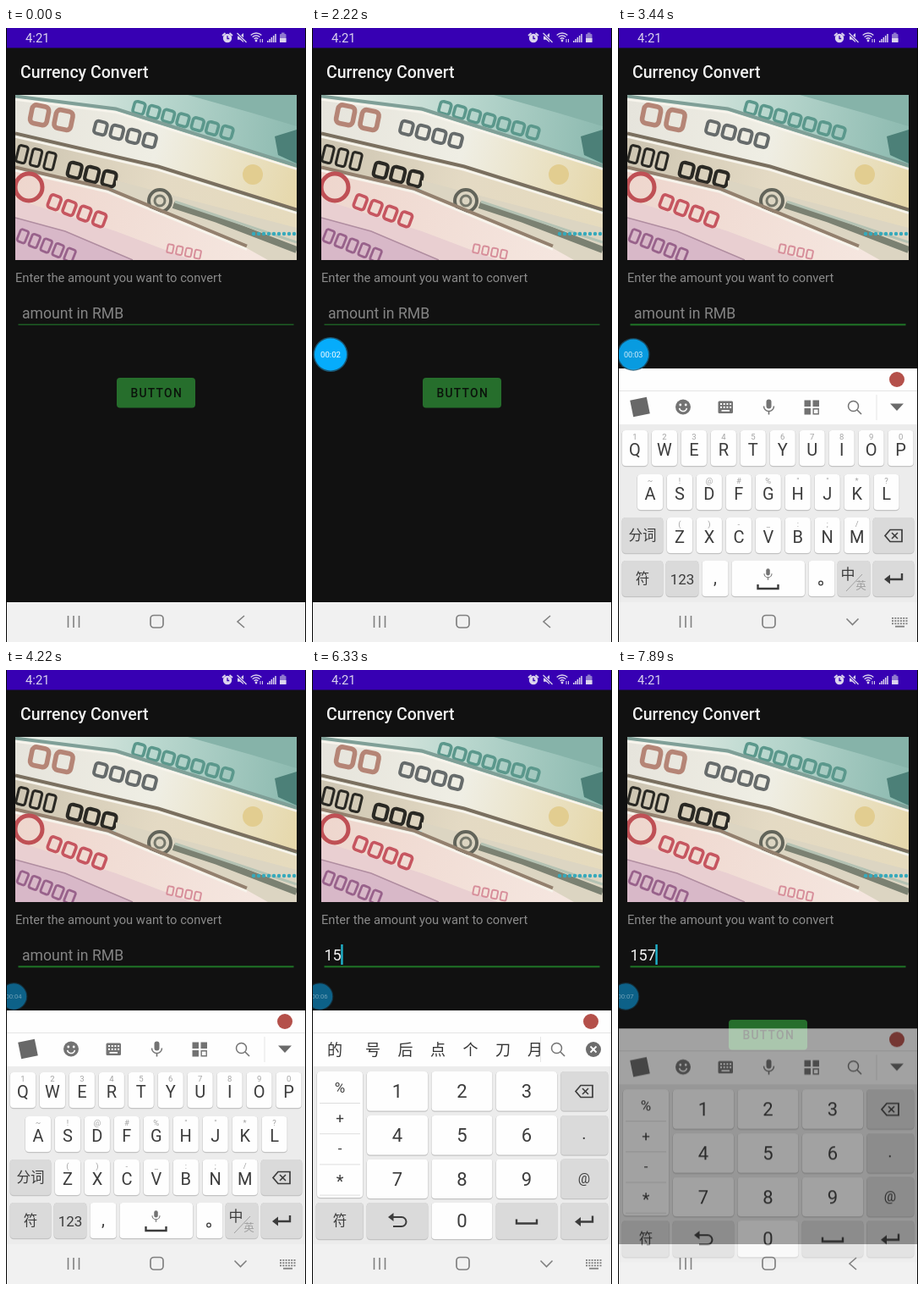
Animation, 355 px wide and 725 px high, one loop 8000 ms. Source, as an HTML page with a canvas:

```html
<!DOCTYPE html>
<html lang="zh-CN">
<head>
<meta charset="utf-8">
<title>Currency Convert</title>
<style>
html, body { margin: 0; width: 100%; height: 100%; overflow: hidden; background: #111; }
canvas { display: block; width: 355px; height: 725px; }
</style>
</head>
<body>
<canvas id="stage"></canvas>
<script>
const W = 355, H = 725, LOOP = 8000;
const FONT = 'Roboto, "Noto Sans CJK SC", "Noto Sans CJK", sans-serif';
const dpr = window.devicePixelRatio || 1;
const TAU = Math.PI * 2;

// Timeline in ms
const BUBBLE_IN = 400, DOCK = 3400, FOCUS = 2700, NUMERIC = 4500, HIDE = 7780;
const TYPED = [[4900, '1'], [5900, '15'], [6800, '157']];

function setup(canvas) {
  canvas.width = W * dpr;
  canvas.height = H * dpr;
  const c = canvas.getContext('2d');
  c.scale(dpr, dpr);
  return c;
}
const screen = setup(document.getElementById('stage'));
const clamp = v => Math.max(0, Math.min(1, v));
const ease = v => 1 - Math.pow(1 - clamp(v), 2);

// All helpers draw into the current context
let g = screen;

function rect(x, y, w, h, color) {
  g.fillStyle = color;
  g.fillRect(x, y, w, h);
}
function round(x, y, w, h, r, color) {
  g.fillStyle = color;
  g.beginPath();
  g.roundRect(x, y, w, h, r);
  g.fill();
}
function roundLine(x, y, w, h, r, color, lw) {
  g.strokeStyle = color;
  g.lineWidth = lw;
  g.beginPath();
  g.roundRect(x, y, w, h, r);
  g.stroke();
}
function disc(x, y, r, color) {
  g.fillStyle = color;
  g.beginPath();
  g.arc(x, y, r, 0, TAU);
  g.fill();
}
function arc(x, y, r, a, b, color, lw) {
  g.strokeStyle = color;
  g.lineWidth = lw;
  g.beginPath();
  g.arc(x, y, r, a, b);
  g.stroke();
}
function trace(pts) {
  g.beginPath();
  for (let i = 0; i < pts.length; i += 2) g.lineTo(pts[i], pts[i + 1]);
}
function line(pts, color, lw) {
  trace(pts);
  g.strokeStyle = color;
  g.lineWidth = lw;
  g.stroke();
}
function poly(pts, color) {
  trace(pts);
  g.fillStyle = color;
  g.fill();
}
function text(s, x, y, size, color, align = 'left', weight = 400) {
  g.font = `${weight} ${size}px ${FONT}`;
  g.textAlign = align;
  g.fillStyle = color;
  g.fillText(s, x, y);
}
function fade(x0, y0, x1, y1, ...colors) {
  const f = g.createLinearGradient(x0, y0, x1, y1);
  colors.forEach((c, i) => f.addColorStop(i / (colors.length - 1), c));
  return f;
}

// Row of slanted blocks suggesting printed lettering
function blocks(x, y, n, w, h, gap, angle, color) {
  g.save();
  g.translate(x, y);
  g.rotate(angle);
  for (let i = 0; i < n; i++) {
    roundLine(i * (w + gap), 0, w, h, w / 4, color, w * 0.28);
  }
  g.restore();
}
// Bright paper edge with a soft shadow above it
function edge(pts, shade) {
  g.save();
  g.translate(0, -2.5);
  line(pts, shade, 4);
  g.translate(0, 4);
  line(pts, '#f7f4ec', 2.5);
  g.restore();
}

function photo() {
  g.save();
  g.beginPath();
  g.rect(11, 79, 333, 195);
  g.clip();
  rect(11, 79, 333, 195, fade(11, 79, 344, 120, '#eef1ea', '#b9d7ce', '#8dbab0'));
  poly([215, 79, 344, 79, 344, 116, 290, 100], '#86b3a9');
  poly([318, 128, 344, 120, 344, 160, 322, 150], '#4c8078');
  blocks(153, 86, 7, 13, 14, 5, 0.27, '#5b988c');
  poly([11, 83, 130, 98, 344, 165, 344, 216, 180, 166, 11, 126],
    fade(11, 100, 344, 190, '#e6e4dc', '#efeee4', '#e6d8ac'));
  edge([11, 83, 130, 98, 344, 165], '#7f9f97');
  blocks(32, 90, 2, 20, 22, 9, 0.2, '#b58576');
  blocks(107, 109, 4, 14, 15, 6, 0.25, '#666b6b');
  disc(292, 173, 12, '#e2cd90');
  poly([11, 127, 180, 166, 344, 217, 344, 240, 160, 196, 11, 166],
    fade(11, 140, 344, 230, '#cdc5b2', '#e4dac4', '#e6dbbd'));
  edge([11, 127, 180, 166, 344, 217], '#7a6f5f');
  blocks(16, 138, 3, 11, 20, 6, 0.24, '#2a2924');
  blocks(76, 158, 3, 15, 17, 6, 0.24, '#2a2924');
  poly([130, 180, 344, 236, 344, 274, 270, 274, 130, 206], '#dcd5c2');
  arc(182, 204, 13, 0, TAU, '#62645a', 4);
  arc(182, 204, 6, 0, TAU, '#75776b', 3);
  line([198, 209, 250, 226, 344, 262], '#7b8172', 8);
  line([200, 205, 344, 253], '#b4c2b3', 3);
  poly([11, 167, 120, 192, 285, 260, 310, 274, 11, 274],
    fade(11, 180, 290, 274, '#eed6cd', '#f5e6df'));
  edge([11, 167, 120, 192, 285, 260], '#93806e');
  poly([11, 202, 130, 240, 220, 274, 11, 274], '#e9cfd1');
  arc(27, 188, 16, 0, TAU, '#bf5055', 5);
  blocks(54, 196, 4, 13, 16, 6, 0.36, '#c65660');
  poly([11, 224, 70, 240, 150, 274, 11, 274], '#d8b8c8');
  line([11, 224, 70, 240, 150, 274], '#b08da0', 1.5);
  blocks(18, 237, 5, 10, 15, 5, 0.38, '#98628b');
  blocks(192, 255, 4, 7, 10, 4, 0.2, '#d78f9b');
  for (let x = 293; x < 342; x += 6) disc(x, 243, 2.2, '#36a9bb');
  g.restore();
}

function statusBar() {
  const ink = '#dcd4ee', bar = '#3700b3';
  rect(0, 0, W, 23.5, bar);
  text('4:21', 23, 17, 14.8, ink);
  // alarm
  disc(262, 12, 5.2, ink);
  line([262, 9.2, 262, 12.5, 264.2, 12.5], bar, 1.3);
  line([256, 9, 259.5, 6], ink, 1.7);
  line([268, 9, 264.5, 6], ink, 1.7);
  // muted speaker
  poly([274, 9.5, 277, 9.5, 281, 6, 281, 17, 277, 13.7, 274, 13.7], ink);
  line([273.5, 6, 284.5, 17], bar, 3);
  line([273.5, 6, 284.5, 17], ink, 1.3);
  // wifi
  for (const r of [3.5, 6.5, 9.5]) arc(296, 15.5, r, -2.3, -0.84, ink, 1.4);
  disc(296, 15, 1.4, ink);
  line([301, 13, 301, 17], ink, 1);
  line([303.5, 13, 303.5, 17], ink, 1);
  // signal
  for (let i = 0; i < 5; i++) rect(309 + i * 2.3, 15 - i * 2, 1.5, 2 + i * 2, ink);
  // battery
  rect(326, 5.5, 3.5, 2, '#8f78cf');
  round(324, 7, 7.5, 10, 1, '#8f78cf');
  rect(324, 12, 7.5, 5, ink);
}

function bubble(t) {
  if (t < BUBBLE_IN) return;
  const p = ease((t - DOCK) / 250);
  const sec = '00:0' + Math.floor(t / 1000);
  g.save();
  g.globalAlpha = 1 - 0.59 * p;
  g.translate(22 - 13 * p, 385.5);
  g.scale(1 - 0.2 * p, 1 - 0.2 * p);
  disc(0, 0, 20.5, '#1a5673');
  disc(0, 0, 19, '#06acfb');
  text(sec, 0, 3.5, 9.6, '#fff', 'center');
  g.restore();
}

function field(t) {
  const focused = t >= FOCUS;
  let value = '', since = FOCUS;
  for (const [at, s] of TYPED) if (t >= at) { value = s; since = at; }
  if (value) text(value, 14.5, 343, 18, '#f2f2f2');
  else text('amount in RMB', 19, 342.5, 17.6, '#858585');
  if (focused) rect(14.5, 349.3, 326, 2, '#1f7427');
  else rect(14.5, 349.6, 326, 1.2, '#21702a');
  if (focused && (t - since) % 1000 < 500) {
    g.font = `18px ${FONT}`;
    const x = value ? 14 + g.measureText(value).width : 15;
    rect(x, 324, 2.4, 24, '#20b2cc');
  }
}

function app(t) {
  rect(0, 0, W, H, '#111');
  statusBar();
  text('Currency Convert', 17, 58.5, 19.5, '#f1f1f1', 'left', 500);
  photo();
  text('Enter the amount you want to convert', 11, 300, 14.7, '#8b8b8b');
  field(t);
  round(131, 413, 93, 35.5, 4, '#266e2c');
  g.letterSpacing = '1.3px';
  text('BUTTON', 147.5, 436, 13.8, '#0b130b', 'left', 500);
  g.letterSpacing = '0px';
  rect(1, 678, W - 2, H - 678, '#f1f1f1');
}

function navIcons(open) {
  const ink = '#808080';
  for (const x of [73.5, 80, 86.5]) line([x, 694, x, 708], ink, 1.6);
  roundLine(171, 693.5, 15, 14.5, 4, ink, 1.7);
  if (!open) {
    line([282, 694, 274, 701, 282, 708], ink, 1.6);
    return;
  }
  line([270.5, 697.5, 277.5, 704.5, 284.5, 697.5], ink, 1.6);
  for (let r = 0; r < 3; r++)
    for (let i = 0; i < 6; i++) rect(324 + i * 3.3, 696 + r * 3.2, 2, 1.8, ink);
  rect(328, 705.8, 11, 1.8, ink);
}

const INK = '#3c3c3c', ICON = '#737373';

function key(x, y, w, h, dark) {
  round(x - 0.5, y, w + 1, h + 1.2, 4.5, '#c3c3c3');
  round(x, y, w, h, 4, dark ? '#dadada' : '#fefefe');
}
function letterRow(chars, marks, x0, y, up) {
  [...chars].forEach((ch, i) => {
    const x = x0 + i * 34.95;
    key(x - 15, y, 30, 42);
    text(ch, x, y + 30, 20, INK, 'center');
    text(marks[i], x, y + up, 9.5, '#a2a2a2', 'center');
  });
}
function backspace(x, y) {
  trace([x - 10, y, x - 4, y - 7, x + 10, y - 7, x + 10, y + 7, x - 4, y + 7]);
  g.closePath();
  g.strokeStyle = INK;
  g.lineWidth = 1.7;
  g.stroke();
  line([x - 2, y - 3.5, x + 5, y + 3.5], INK, 1.6);
  line([x + 5, y - 3.5, x - 2, y + 3.5], INK, 1.6);
}
function enter(x, y) {
  line([x + 10, y - 6, x + 10, y + 1, x - 6, y + 1], INK, 2.4);
  poly([x - 11, y + 1, x - 4, y - 4.5, x - 4, y + 6.5], INK);
}
function spaceMark(x, y, color) {
  line([x - 12, y - 5, x - 12, y, x + 12, y, x + 12, y - 5], color, 2.4);
}
function mic(x, y, s, color) {
  round(x - 3 * s, y - 9 * s, 6 * s, 11 * s, 3 * s, color);
  arc(x, y - s, 6 * s, 0, Math.PI, color, 1.5 * s);
  line([x, y + 5 * s, x, y + 9 * s], color, 1.6 * s);
}
function search(x, y) {
  arc(x - 1.5, y - 1.5, 6, 0, TAU, ICON, 1.5);
  line([x + 3, y + 3, x + 8, y + 8], ICON, 1.6);
}

function letters() {
  letterRow('QWERTYUIOP', '1234567890', 20, 475, 11);
  letterRow('ASDFGHJKL', '~!@#%""*?', 38, 527, 11);
  letterRow('ZXCVBNM', '()-_:;/', 73, 578, 11);
  key(5, 578, 48, 42, true);
  text('分词', 29, 605, 16.5, INK, 'center');
  key(302, 578, 48, 42, true);
  backspace(326, 599.5);
  key(5, 629, 48, 42, true);
  text('符', 29, 656, 16.5, INK, 'center');
  key(57, 629, 38, 42, true);
  text('123', 76, 656.5, 17, INK, 'center');
  key(99.5, 629, 31, 42);
  text(',', 115, 656, 20, INK, 'center');
  key(134.5, 629, 86.5, 42);
  mic(177.5, 645, 0.75, ICON);
  spaceMark(177.5, 662, INK);
  key(225.5, 629, 31, 42);
  arc(240, 655.5, 2.3, 0, TAU, INK, 1.3);
  key(260, 629, 38, 42, true);
  text('中', 272, 651, 17, INK, 'center');
  line([270, 665, 289, 645], '#a0a0a0', 1);
  text('英', 287.5, 663, 12.5, '#a0a0a0', 'center');
  key(302, 629, 48, 42, true);
  enter(326, 650);
}

function digits() {
  key(6, 474, 54, 149);
  ['%', '+', '-', '*'].forEach((s, i) => {
    const y = 493 + i * 36.2;
    text(s, 33, y + (s === '*' ? 9 : 6), s === '*' ? 20 : 17, INK, 'center');
    rect(9, 511 + i * 36.2, 48, 1, '#dedede');
  });
  const cols = [65, 141.5, 218], rows = [474, 526, 577.5];
  for (let i = 0; i < 9; i++) {
    const x = cols[i % 3], y = rows[Math.floor(i / 3)];
    key(x, y, 72, 46.5);
    text(i + 1, x + 36, y + 31, 22, INK, 'center');
  }
  for (const y of rows) key(294.5, y, 55.5, 46.5, true);
  backspace(322, 497.5);
  text('.', 322, 554, 20, INK, 'center');
  text('@', 322, 606, 16, INK, 'center');
  key(5, 629, 55.5, 43, true);
  text('符', 33, 656, 16.5, INK, 'center');
  key(65, 629, 72, 43, true);
  g.strokeStyle = INK;
  g.lineWidth = 2;
  g.beginPath();
  g.moveTo(94, 646);
  g.lineTo(106, 646);
  g.arc(106, 651.5, 5.5, -Math.PI / 2, Math.PI / 2);
  g.lineTo(96, 657);
  g.stroke();
  poly([90, 646, 96.5, 641, 96.5, 651], INK);
  key(141.5, 629, 72, 43);
  text('0', 177.5, 658, 22, INK, 'center');
  key(218, 629, 72, 43, true);
  spaceMark(254, 653.5, INK);
  key(294.5, 629, 55.5, 43, true);
  enter(322, 650.5);
}

function toolbar() {
  g.save();
  g.translate(26, 447.5);
  g.rotate(-0.2);
  rect(-10, -10, 20, 20, '#686868');
  g.restore();
  disc(77, 447.5, 9, ICON);
  disc(73.8, 445, 1.4, '#fff');
  disc(80.2, 445, 1.4, '#fff');
  arc(77, 448, 4.5, 0.2, Math.PI - 0.2, '#fff', 1.6);
  round(118.5, 440.5, 17.5, 14.5, 1.5, ICON);
  for (let r = 0; r < 2; r++)
    for (let i = 0; i < 4; i++) rect(121 + i * 3.7, 443 + r * 3.8, 2, 2, '#fff');
  rect(122.5, 451, 9.5, 1.7, '#fff');
  mic(178.5, 447.5, 1, ICON);
  rect(220.5, 439.5, 7.5, 7.5, ICON);
  rect(230.5, 439.5, 7.5, 7.5, ICON);
  rect(220.5, 449, 7.5, 7.5, ICON);
  roundLine(231.2, 449.7, 6, 6, 0, ICON, 1.4);
  search(280, 448);
  rect(305.5, 433, 1, 30, '#e3e3e3');
  poly([322, 443.5, 338, 443.5, 330, 452], '#6a6a6a');
}

function candidates(list) {
  const xs = [27, 72, 110.5, 149, 187.5, 226, 264];
  g.save();
  g.beginPath();
  g.rect(0, 430, 270, 38);
  g.clip();
  [...list].forEach((ch, i) => text(ch, xs[i], 455, 18, '#333', 'center'));
  g.restore();
  rect(270, 433, 1, 30, '#e6e6e6');
  search(291, 448);
  disc(333, 448, 9, '#6d6d6d');
  line([329.5, 444.5, 336.5, 451.5], '#fff', 1.8);
  line([336.5, 444.5, 329.5, 451.5], '#fff', 1.8);
}

const layer = document.createElement('canvas');
const panel = setup(layer);

function drawPanel(t) {
  g = panel;
  g.clearRect(0, 0, W, H);
  rect(1, 402, W - 2, 66, '#fefefe');
  rect(1, 428, W - 2, 1, '#e4e4e4');
  rect(1, 468, W - 2, H - 468, '#ececec');
  rect(1, 678, W - 2, H - 678, '#f1f1f1');
  disc(330, 415, 9, '#b4504a');
  if (t >= TYPED[0][0] && t < HIDE) candidates(t < TYPED[1][0] ? '号点个刀块月分' : '的号后点个刀月');
  else toolbar();
  if (t < NUMERIC) letters();
  else digits();
  g = screen;
}

function keyboard(t) {
  if (t < FOCUS) return;
  const inP = clamp((t - FOCUS) / 300), outP = clamp((t - HIDE) / 300);
  const dy = 75 * (1 - inP) + 58 * outP;
  const alpha = clamp(inP * 1.13) * (1 - outP * 1.05);
  if (alpha <= 0) return;
  drawPanel(t);
  g.globalAlpha = alpha;
  g.drawImage(layer, 0, dy, W, H);
  g.globalAlpha = 1;
}

function draw(t) {
  app(t);
  keyboard(t);
  navIcons(t >= FOCUS && t < HIDE);
  bubble(t);
  rect(0, 0, 1, H, '#080808');
  rect(W - 1, 0, 1, H, '#080808');
}

let start;
function tick(now) {
  if (start === undefined) start = now;
  draw((now - start) % LOOP);
  requestAnimationFrame(tick);
}
draw(0);
requestAnimationFrame(tick);
</script>
</body>
</html>
```
